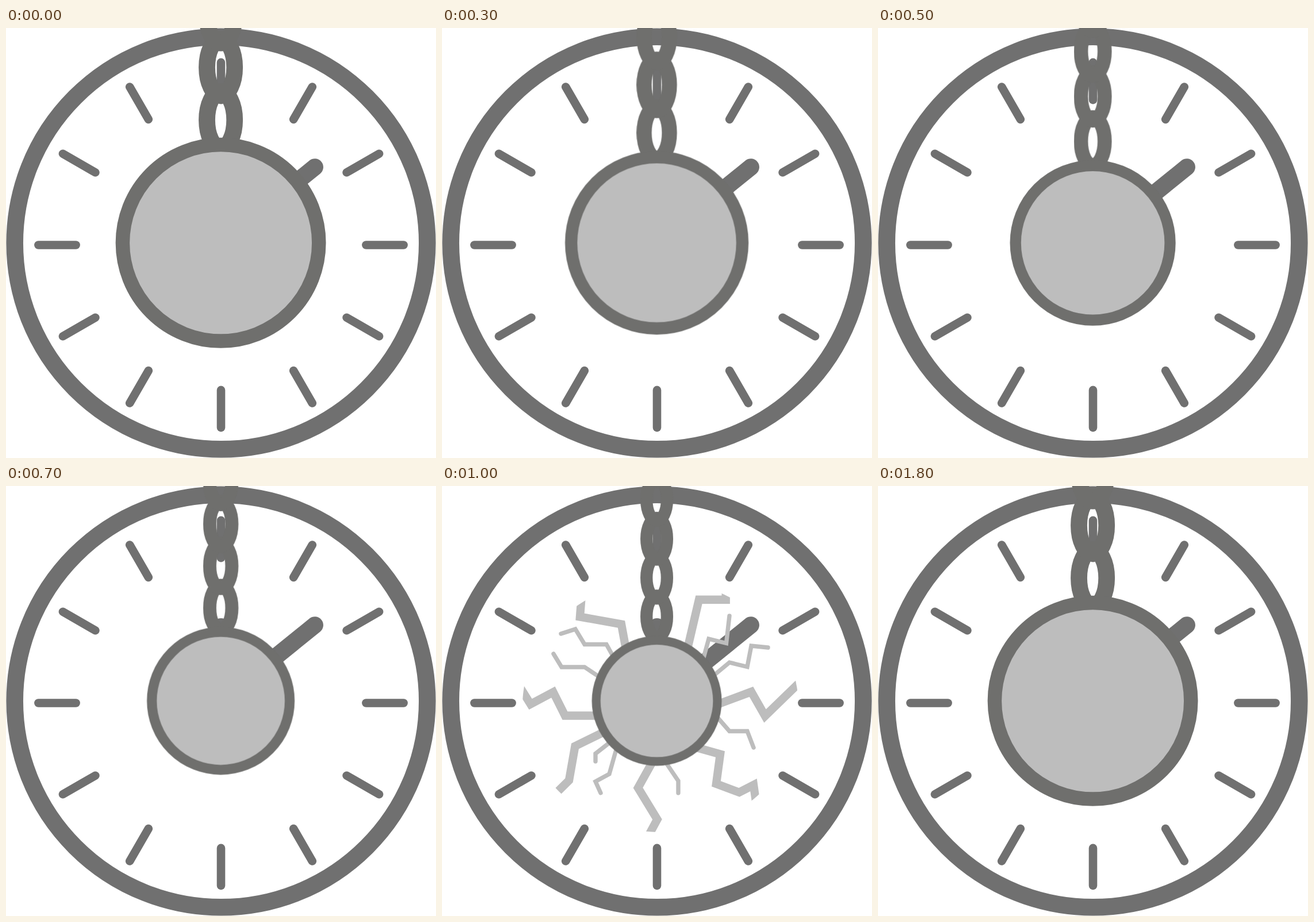
An HTML page without scripts for the animation above (2200 ms loop, 748 by 748 pixels).

```html
<!DOCTYPE html>
<html lang="en">
<head>
<meta charset="utf-8">
<title>Clock and wrecking ball</title>
<style>
  html, body { margin: 0; width: 100%; height: 100%; overflow: hidden; background: #fff; }
  svg { display: block; width: 100%; height: 100%; }
  .line { fill: none; stroke: #707070; stroke-linecap: round; }
  .links { fill: none; stroke: #6f6f6d; stroke-width: 28.8; }
  .cracks { fill: none; stroke: #bdbdbd; stroke-linecap: round; }

  .ball, .chain, .reach { animation: 2200ms infinite; }
  .ball { transform-origin: 373.6px 373.8px; animation-name: ball; }
  .chain { transform-origin: 373.6px 417.8px; animation-name: chain; }
  .reach { transform-origin: 380px 383px; animation-name: reach; }

  /* One jump every 100 ms, slowing down as the ball swings away */
  @keyframes ball {
    0% { transform: scale(1); animation-timing-function: steps(7); }
    31.81% { transform: scale(.7025); animation-timing-function: steps(3); }
    45.45% { transform: scale(.6175); animation-timing-function: steps(2); }
    54.54% { transform: scale(.575); animation-timing-function: step-end; }
    81.81%, 100% { transform: scale(1); animation-timing-function: step-end; }
  }
  @keyframes chain {
    0% { transform: scale(1); animation-timing-function: steps(7); }
    31.81% { transform: scale(.798); animation-timing-function: steps(3); }
    45.45% { transform: scale(.74); animation-timing-function: steps(2); }
    54.54% { transform: scale(.711); animation-timing-function: step-end; }
    81.81%, 100% { transform: scale(1); animation-timing-function: step-end; }
  }
  @keyframes reach {
    0% { transform: scale(0); animation-timing-function: step-end; }
    31.81% { transform: scale(0); animation-timing-function: steps(5); }
    54.54% { transform: scale(1.667); animation-timing-function: step-end; }
    81.81%, 100% { transform: scale(0); animation-timing-function: step-end; }
  }
</style>
</head>
<body>
<svg viewBox="0 0 748 748">
  <defs>
    <path id="tick" d="M374 59.9V125.1"/>
    <g id="quarter">
      <use href="#tick"/>
      <use href="#tick" transform="rotate(30 374 377.5)"/>
      <use href="#tick" transform="rotate(60 374 377.5)"/>
    </g>
    <ellipse id="link" cx="373.6" cy="160" rx="24.1" ry="49"/>
    <clipPath id="spread">
      <ellipse class="reach" cx="380" cy="383" rx="240" ry="219"/>
    </clipPath>
  </defs>

  <circle class="line" cx="374" cy="374" r="358.8" stroke-width="29.5"/>
  <g class="line" stroke-width="14.6">
    <use href="#quarter"/>
    <use href="#quarter" transform="rotate(90 374 377.5)"/>
    <use href="#quarter" transform="rotate(180 374 377.5)"/>
    <use href="#quarter" transform="rotate(270 374 377.5)"/>
  </g>
  <path class="line" stroke-width="29.5" d="M374 244.7V374L537.2 242"/>

  <g class="cracks" clip-path="url(#spread)">
    <g stroke-width="14.4">
      <path d="M176 72L248 123.5L240 227.5L312 240.5L323 300"/>
      <path d="M542 50V102L493.7 133V197.7H447L423 300"/>
      <path d="M18 291L56 335L114 315L154 379.5L193.5 358.5L214 399.5H300"/>
      <path d="M741 372L702 324L659 361L627 337L562 400L538 358L460 387"/>
      <path d="M617 635L592 589.5L548.5 566L542 520L517 533L477 518L484 466.5L425 450"/>
      <path d="M405 721L341 642L374.5 580L341 525L380 455"/>
      <path d="M108 598H168V564.5L221 512L231.5 452.5L300 419"/>
    </g>
    <g stroke-width="7.4">
      <path d="M207 257L232 249L248 275.5H286L303 306"/>
      <path d="M194 292L208 315H248L284 339"/>
      <path d="M267 479V465.5L310 432"/>
      <path d="M276 534L267 514L291 501L306 448"/>
      <path d="M411 534V513L380 467"/>
      <path d="M542 455L531 426.5H500L470 392"/>
      <path d="M567 281L538 278L531 314.5L500 307L465 336"/>
      <path d="M500 226L494.5 273.5L464 266L453 306"/>
    </g>
  </g>

  <g class="chain links">
    <use href="#link"/>
    <use href="#link" y="-91.4"/>
    <use href="#link" y="-182.8"/>
    <use href="#link" y="-274.2"/>
    <use href="#link" y="-365.6"/>
  </g>
  <circle class="ball" cx="373.6" cy="373.8" r="170.7" fill="#bdbdbd" stroke="#6f6f6d" stroke-width="24.5"/>
</svg>
</body>
</html>
```
